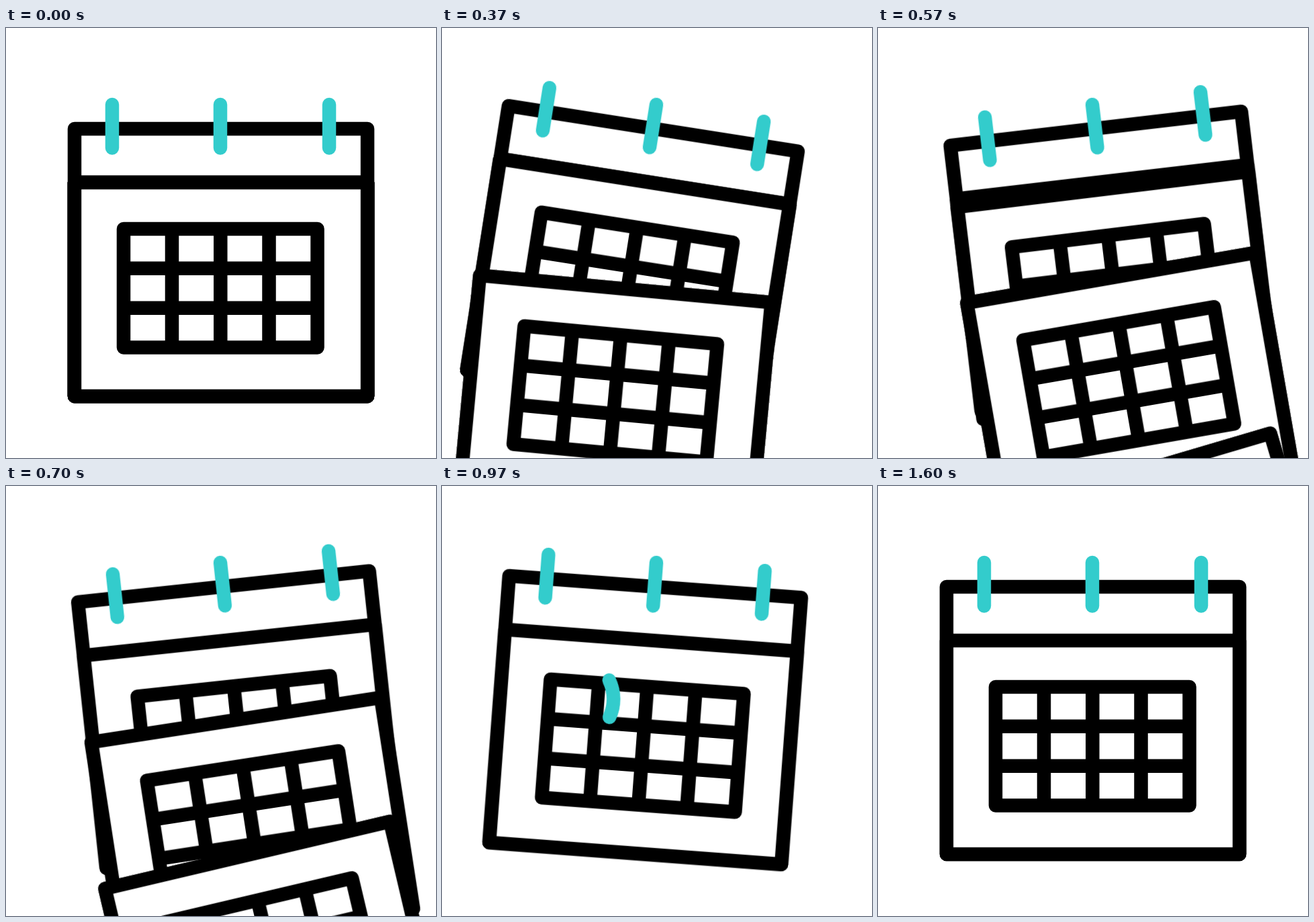
Write an HTML page without scripts that moves like this. It is 640 by 640 pixels and loops after 1.67 s.

```html
<!DOCTYPE html>
<html lang="en">
<head>
<meta charset="utf-8">
<title>Calendar</title>
<style>
  :root {
    --loop: 1670ms;
    --ease: cubic-bezier(.333, 0, .667, 1);
  }
  html, body {
    margin: 0;
    height: 100%;
    overflow: hidden;
    background: #fff;
  }
  svg {
    display: block;
    width: 100%;
    height: 100%;
    stroke-width: 20.5;
    stroke-linecap: round;
    stroke-linejoin: round;
  }
  .ink { fill: #fff; stroke: #000; }
  .accent { fill: none; stroke: #3cc; }

  .calendar, .page, .ring {
    animation: var(--loop) var(--ease) infinite;
  }
  .calendar {
    transform-origin: 319px 114px;
    animation-name: swing;
  }
  .page {
    transform-origin: 320px 287px;
    animation-name: fall;
    animation-delay: var(--start);
  }
  .ring {
    stroke-dasharray: 360 400;
    visibility: hidden;
    animation-name: draw, reveal;
    animation-timing-function: var(--ease), step-end;
  }

  @keyframes swing {
    0%, 4.2% { transform: rotate(0deg); }
    19.2% { transform: rotate(10.3deg); }
    37.2% { transform: rotate(-8.05deg); }
    56.4% { transform: rotate(4.5deg); }
    69.2%, 100% { transform: rotate(0deg); }
  }
  @keyframes fall {
    0% { transform: translateY(0) rotate(0deg); }
    37.9%, 100% { transform: translateY(600px) rotate(-13.4deg); }
  }
  @keyframes draw {
    0%, 53.1% { stroke-dashoffset: 360; }
    74.5% { stroke-dashoffset: 0; }
    95.8%, 100% { stroke-dashoffset: -360; }
  }
  @keyframes reveal {
    0% { visibility: hidden; }
    53.2% { visibility: visible; }
    95.7%, 100% { visibility: hidden; }
  }
</style>
</head>
<body>
<svg viewBox="0 0 640 640">
  <defs>
    <g id="sheet">
      <path d="M102 230H538V548H102Z"/>
      <path d="M175 299H463.5V475.5H175ZM247 299V475.5M319.3 299V475.5M391.5 299V475.5M175 357.7H463.5M175 416.7H463.5"/>
    </g>
  </defs>
  <g class="calendar">
    <g class="ink">
      <path d="M102 150H538V548H102Z"/>
      <use href="#sheet"/>
      <use href="#sheet" class="page" style="--start: 520ms"/>
      <use href="#sheet" class="page" style="--start: 370ms"/>
      <use href="#sheet" class="page" style="--start: 155ms"/>
    </g>
    <path class="accent" d="M158 114V178.5M319 114V178.5M481 114V178.5"/>
    <circle class="accent ring" cx="206.2" cy="326" r="64.5" pathLength="360" transform="rotate(-30 206.2 326)"/>
  </g>
</svg>
</body>
</html>
```
